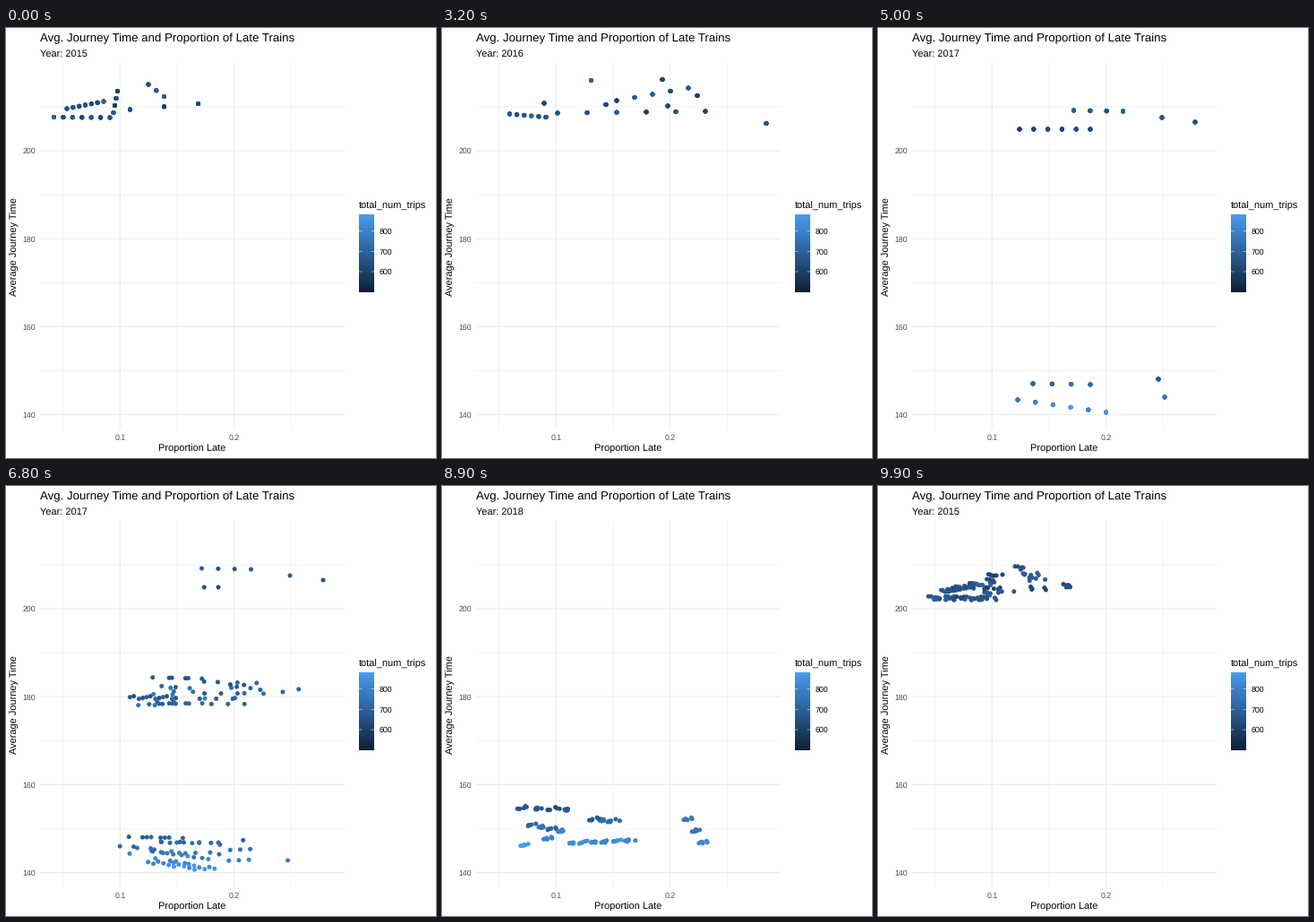
A matplotlib script for the animation above (10 s loop, 480 px wide and 480 px high).

```python
import matplotlib.pyplot as plt
import numpy as np
from matplotlib.animation import FuncAnimation
from matplotlib.colors import LinearSegmentedColormap

plt.rcParams["font.family"] = "Liberation Sans"
plt.rcParams["text.hinting"] = "none"

SIZE, FRAMES, ROUTES = 480, 100, 6
GRID, TICK_TEXT = "#EBEBEB", "#4D4D4D"
LEFT, RIGHT, TOP, BOTTOM = 38, 377.5, 39, 448
BLUES = LinearSegmentedColormap.from_list(
    "trips", ["#0F1F33", "#2B5F98", "#489CF0"])
YEARS = [2015, 2016, 2017, 2018]
MOVES = [(12, 25), (38, 50), (63, 75), (88, 100)]
rng = np.random.default_rng(4)


def strand(n, start, end):
    """Evenly spaced points from start to end."""
    return np.linspace(start, end, n)


def year_rows(*strands, shuffle=False):
    """One row (x, y, trips) per route and month, repeated route by route."""
    points = np.vstack(strands)
    if shuffle:
        points = rng.permutation(points)
    # Shorter journeys (lower on the stage) have more trips.
    trips = 650 + 4.3 * np.maximum(0, points[:, 1] - 384)
    trips += rng.normal(0, 30, len(points))
    return np.tile(np.column_stack([points, trips]), (ROUTES, 1))


ROWS = [
    year_rows(strand(7, (53.5, 99.5), (116, 100)),
              strand(7, (68, 90), (109, 82)),
              strand(4, (120, 94.5), (124.5, 70.5)),
              strand(3, (138.5, 91), (214.5, 84.5)),
              strand(3, (159, 63), (176.5, 76.5)), shuffle=True),
    year_rows(strand(6, (75.5, 96), (116, 99.5)),
              strand(6, (129, 95), (294, 93)),
              strand(5, (195, 81), (275, 67)),
              strand(3, (114, 84), (252, 87)),
              strand(2, (166.5, 58.5), (246, 57.5)),
              strand(2, (285, 75.5), (362, 106.5)), shuffle=True),
    year_rows(strand(6, (156, 415), (254.5, 429)),
              strand(2, (313, 392), (320, 412)),
              strand(6, (158, 113), (237, 113)),
              strand(4, (218.5, 92), (273.5, 93)),
              strand(2, (317, 100), (354, 105)),
              strand(4, (173, 397), (237, 398))),
    year_rows(strand(4, (87, 384), (142, 386)),
              strand(3, (174.5, 398), (197, 400)),
              strand(6, (149, 427), (216, 424)),
              strand(4, (99, 405), (135, 412)),
              strand(3, (307, 426), (288.5, 397.5)),
              strand(2, (89, 429), (118, 421))),
]

fig = plt.figure(figsize=(SIZE / 72, SIZE / 72), dpi=72, facecolor="white")
ax = fig.add_axes([0, 0, 1, 1])
ax.axis("off")


def label(x, y, text, size, color="black", **kw):
    return ax.text(x, y, text, fontsize=size, color=color, **kw)


def line(xs, ys, color, width, z=1):
    ax.plot(xs, ys, color=color, lw=width, solid_capstyle="butt",
            snap=False, zorder=z)


def draw_grid():
    for i in range(5):
        x = 63.6 + 63.7 * i
        line([x, x], [TOP, BOTTOM], GRID, 1.07 if i % 2 else 0.53)
    for i in range(8):
        y = 88 + 49.07 * i
        line([LEFT, RIGHT], [y, y], GRID, 1.07 if i % 2 else 0.53)


def draw_labels():
    label(38, 15, "Avg. Journey Time and Proportion of Late Trains", 13.2)
    label(207.5, 473, "Proportion Late", 11, ha="center")
    label(10, 244, "Average Journey Time", 11, rotation=90,
          ha="center", va="center")
    for i, text in enumerate(["0.1", "0.2"]):
        label(127.3 + 127.4 * i, 460, text, 8.8, TICK_TEXT, ha="center")
    for i in range(4):
        label(33, 140.3 + 98.13 * i, str(200 - 20 * i), 8.8, TICK_TEXT,
              ha="right")


def draw_legend():
    x0, x1, y0, y1 = 394, 411, 208, 295
    label(393.5, 202, "total_num_trips", 11)
    ax.imshow(np.linspace(1, 0, 200)[:, None], cmap=BLUES, aspect="auto",
              extent=(x0, x1, y1, y0), zorder=1)
    for i in range(3):
        y = 226.6 + 22.7 * i
        line([x0, x0 + 3.4], [y, y], "white", 0.5, 2)
        line([x1 - 3.4, x1], [y, y], "white", 0.5, 2)
        label(416.5, y + 3.2, str(800 - 100 * i), 8.8)


draw_grid()
draw_labels()
draw_legend()
ax.set(xlim=(0, SIZE), ylim=(SIZE, 0))
subtitle = label(38, 32, "", 11)
dots = ax.scatter([], [], s=5 ** 2, c=[], cmap=BLUES, vmin=500, vmax=880,
                  linewidths=0, zorder=3)


def pose(frame):
    """Rows on view and the year named above them."""
    for k, (start, end) in enumerate(MOVES):
        if frame <= start:
            return ROWS[k], YEARS[k]
        if frame <= end:
            a, b = ROWS[k], ROWS[(k + 1) % 4]
            n = min(len(a), len(b))
            t = (frame - start) / (end - start)
            moving = a[:n] + (b[:n] - a[:n]) * t
            past_half = frame - start > np.ceil((end - start) / 2)
            # Rows without a partner wait in place until the move is over.
            return np.vstack([moving, a[n:]]), YEARS[(k + past_half) % 4]


def update(frame):
    rows, year = pose(frame)
    dots.set_offsets(rows[:, :2])
    dots.set_array(rows[:, 2])
    subtitle.set_text(f"Year: {year}")
    return dots, subtitle


anim = FuncAnimation(fig, update, frames=FRAMES, interval=100, repeat=True)
plt.show()
```
